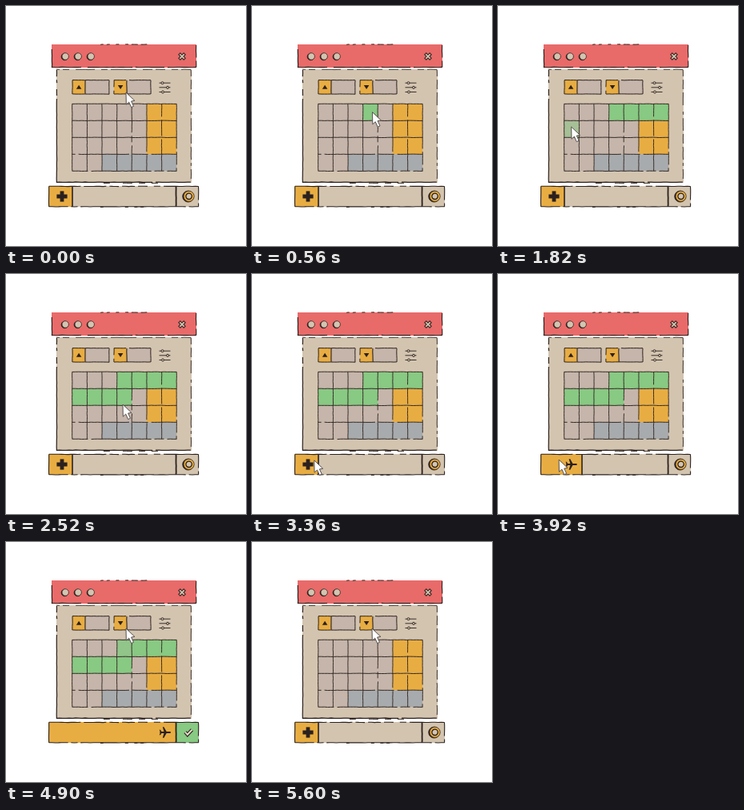
These frames come from a looping animation (300x300 px, 5.67 s). An HTML page:

```html
<!DOCTYPE html>
<html lang="en">
<head>
<meta charset="utf-8">
<style>
html, body { margin: 0; width: 100%; height: 100%; overflow: hidden; background: #fff; }
svg { display: block; width: 300px; height: 300px; }
</style>
</head>
<body>
<svg id="stage" viewBox="0 0 300 300"></svg>
<script>
const NS = 'http://www.w3.org/2000/svg';
const stage = document.getElementById('stage');
const INK = '#2b211e', RED = '#e86a69', TAN = '#d3c4b0', GOLD = '#e8ad42';
const CELL = '#c5b5aa', SLATE = '#a8abad', GREEN = '#88c983';
const LOOP = 5670, STEP = 70;

function add(tag, attrs, parent = stage) {
  const el = document.createElementNS(NS, tag);
  set(el, attrs);
  parent.appendChild(el);
  return el;
}
function set(el, attrs) {
  for (const k in attrs) el.setAttribute(k, attrs[k]);
}
const rect = (x, y, width, height, fill) => add('rect', { x, y, width, height, fill });
const path = (d, attrs, parent) => add('path', { d, fill: 'none', ...attrs }, parent);
const circle = (cx, cy, r, fill, width = 1, parent) =>
  add('circle', { cx, cy, r, fill, stroke: INK, 'stroke-width': width }, parent);

let seed = 11;
function rnd() {
  seed = (seed * 16807) % 2147483647;
  return seed / 2147483647;
}

// Worn ink line: short strokes with slight wobble and occasional gaps
function ink(x1, y1, x2, y2, width = 1, gap = 0.06, wobble = 0.35) {
  const n = Math.max(2, Math.round(Math.hypot(x2 - x1, y2 - y1) / 4));
  const at = i => {
    const k = i / n;
    return (x1 + (x2 - x1) * k + (rnd() - 0.5) * wobble).toFixed(1) + ' ' +
           (y1 + (y2 - y1) * k + (rnd() - 0.5) * wobble).toFixed(1);
  };
  let d = 'M' + at(0);
  for (let i = 1; i <= n; i++) d += (rnd() < gap ? 'M' : 'L') + at(i);
  return path(d, { stroke: INK, 'stroke-width': width });
}
function inkBox(x, y, w, h, width, gap) {
  ink(x, y, x + w, y, width, gap);
  ink(x + w, y, x + w, y + h, width, gap);
  ink(x, y + h, x + w, y + h, width, gap);
  ink(x, y, x, y + h, width, gap);
}

// Title bar
rect(57, 48, 181, 29, RED);
ink(57.5, 54, 57.5, 77, 1.2);
ink(237.7, 49, 237.7, 76, 1.1, 0.25);
ink(58, 76.6, 238, 76.6, 1.1, 0.12);
ink(118, 48, 188, 48, 1, 0.6);
for (const x of [74, 90, 106]) {
  circle(x - 0.5, 63.4, 4.3, INK, 1);
  circle(x + 0.2, 63, 4.2, TAN, 0.7);
}
const close = 'M217.8 60.8L222.2 65.2M222.2 60.8L217.8 65.2';
path(close, { stroke: INK, 'stroke-width': 3.8, 'stroke-linecap': 'square' });
path(close, { stroke: TAN, 'stroke-width': 1.8, 'stroke-linecap': 'square' });

// Panel
rect(63, 79, 169, 142, TAN);
ink(63.4, 80, 63.4, 220, 1.2);
ink(63, 220.2, 231, 220.2, 1.3);
ink(231.4, 80, 231.4, 220, 0.9, 0.3);
ink(63, 79.4, 231, 79.4, 0.8, 0.25);
ink(118, 221.5, 190, 221.5, 0.9, 0.55);

// Steppers
function stepper(x, up) {
  rect(x + 16, 92.5, 30, 17.5, CELL);
  rect(x, 92.5, 16, 17.5, GOLD);
  inkBox(x, 92.7, 46, 17.3, 1);
  ink(x + 16, 93, x + 16, 110, 1.1, 0);
  const s = up ? -1 : 1;
  path(`M${x + 4.8} ${101.3 - 2.4 * s}h6.6l-3.3 ${5 * s}z`, { fill: INK });
}
stepper(83, true);
stepper(135, false);

// Slider icon
[[96.2, 195.5], [101.8, 202], [107.5, 196]].forEach(([y, x]) => {
  path(`M191.5 ${y}H205.5`, { stroke: INK, 'stroke-width': 0.9 });
  circle(x, y, 1.5, TAN, 0.9);
});

// Calendar grid
const GX = 82.7, GY = 122.3, CW = 18.65, CH = 21;
const cellRect = (row, col, fill) => rect(GX + col * CW, GY + row * CH, CW, CH, fill);
for (let r = 0; r < 4; r++)
  for (let c = 0; c < 7; c++)
    cellRect(r, c, r < 3 && c > 4 ? GOLD : r === 3 && c > 1 ? SLATE : CELL);

// Selected days, each with the time it lights up and the time it clears
const days = [];
function select(row, from, start, clear) {
  for (let k = 0; k < 4; k++) {
    days.push({
      el: cellRect(row, from + k, GREEN),
      on: start + k * 140,
      off: clear + k * 35
    });
  }
}
select(0, 3, 490, 4850);
select(1, 0, 1820, 4970);

for (let r = 0; r <= 4; r++) ink(GX, GY + r * CH, GX + 7 * CW, GY + r * CH, 0.95);
for (let c = 0; c <= 7; c++) ink(GX + c * CW, GY, GX + c * CW, GY + 4 * CH, 0.9);

// Bottom bar
rect(53, 225, 188, 26, TAN);
const fillBar = rect(53, 225, 30, 26, GOLD);
const edge = path('M0 225.5V251', { stroke: INK, 'stroke-width': 1.6 });
const greenBox = rect(213, 225, 28, 26, GREEN);
inkBox(53.6, 225.4, 187, 25.4, 1.1, 0.08);
ink(212.6, 225, 212.6, 251, 1.8, 0);
ink(118, 251.4, 172, 251.4, 0.9, 0.5);

const ring = add('g', {});
circle(-0.6, 0.3, 7, INK, 0.8, ring);
circle(0.3, 0, 6.6, GOLD, 0.7, ring);
circle(0.3, 0, 3.7, TAN, 1.3, ring);
const check = add('g', {});
const tick = 'M-4 -0.3L-1.2 2.8L4.5 -3.2';
path(tick, { stroke: INK, 'stroke-width': 4.2 }, check);
path(tick, { stroke: '#e3dcc8', 'stroke-width': 2 }, check);

// Plus sign that turns into a plane: body, wings and tail
const icon = add('g', { fill: INK });
const body = path('', { fill: INK }, icon);
const wings = path('', { fill: INK }, icon);
const tail = path('', { fill: INK }, icon);

const cursor = path('M0 0L0.3 15.2L3.7 12.1L6.6 18.6L9.5 17.3L6.6 11L10.9 10.4Z', {
  fill: '#fff', stroke: '#57504e', 'stroke-width': 1, 'stroke-linejoin': 'round'
});

// time, x, y of the pointer tip
const route = [
  [0, 150, 108], [70, 150, 108], [460, 146, 132], [1050, 205, 140], [1220, 205, 140],
  [1780, 91, 151], [2400, 147, 157], [2520, 146, 163], [3180, 78, 233],
  [4060, 76, 232], [4830, 150, 108], [LOOP, 150, 108]
];
const mix = (a, b, k) => a + (b - a) * k;
const ease = k => k * k * (3 - 2 * k);
const ramp = (t, a, b) => ease(Math.min(1, Math.max(0, (t - a) / (b - a))));

function pointer(t) {
  let i = 1;
  while (i < route.length - 1 && route[i][0] < t) i++;
  const a = route[i - 1], b = route[i];
  const k = ramp(t, a[0], b[0]);
  return [mix(a[1], b[1], k), mix(a[2], b[2], k)];
}

function drawIcon(k) {
  const m = (a, b) => mix(a, b, k).toFixed(2);
  const h = m(2.4, 1.1), nose = m(6.6, 6.3), wing = m(6.6, 6.8);
  set(body, { d: `M${m(-6.6, -6.5)} -${h}H${nose}Q${m(6.6, 8)} 0 ${nose} ${h}H${m(-6.6, -6.5)}Z` });
  const root = m(2.4, 2.2), tipA = m(2.4, -1.6), tipB = m(-2.4, -3.2), back = m(-2.4, -1.2);
  set(wings, { d: `M${root} 0L${tipA} -${wing}H${tipB}L${back} 0L${tipB} ${wing}H${tipA}Z` });
  const s = 3.2 * k;
  set(tail, { d: `M-4 0L-6 ${-s}H-7.3L-6 0L-7.3 ${s}H-6Z`, opacity: k });
}

function render(time) {
  const t0 = Math.floor((time % LOOP) / STEP) * STEP;
  // the finished state rests for a moment before it resets
  const t = t0 < 4900 ? t0 : t0 < 5250 ? 4900 : t0 - 280;

  for (const d of days) {
    const o = ramp(t, d.on - STEP, d.on + STEP) * (1 - ramp(t, d.off, d.off + 200));
    set(d.el, { opacity: o.toFixed(3) });
  }

  const reset = ramp(t, 4920, 5300);
  const grow = ramp(t, 3690, 4570) * (1 - reset);
  const width = mix(30, 160, grow);
  set(fillBar, { width });
  set(edge, { transform: `translate(${53 + width} 0)` });

  const morph = ramp(t, 3500, 3920) * (1 - reset);
  const press = 1 - 0.15 * ramp(t, 3360, 3430) * (1 - ramp(t, 3430, 3570));
  set(icon, { transform: `translate(${mix(70, 199, grow)} 238) scale(${press})` });
  drawIcon(morph);

  const done = ramp(t, 4430, 4700) * (1 - reset);
  set(greenBox, { opacity: done });
  set(ring, { transform: `translate(228.3 237.8) scale(${1 - done})`, opacity: done > 0.98 ? 0 : 1 });
  set(check, { transform: `translate(228 238) scale(${done})`, opacity: done < 0.02 ? 0 : 1 });

  const [x, y] = pointer(t);
  set(cursor, { transform: `translate(${x.toFixed(2)} ${y.toFixed(2)})` });
}

const start = performance.now();
function loop() {
  render(performance.now() - start);
  requestAnimationFrame(loop);
}
render(0);
requestAnimationFrame(loop);
</script>
</body>
</html>
```
